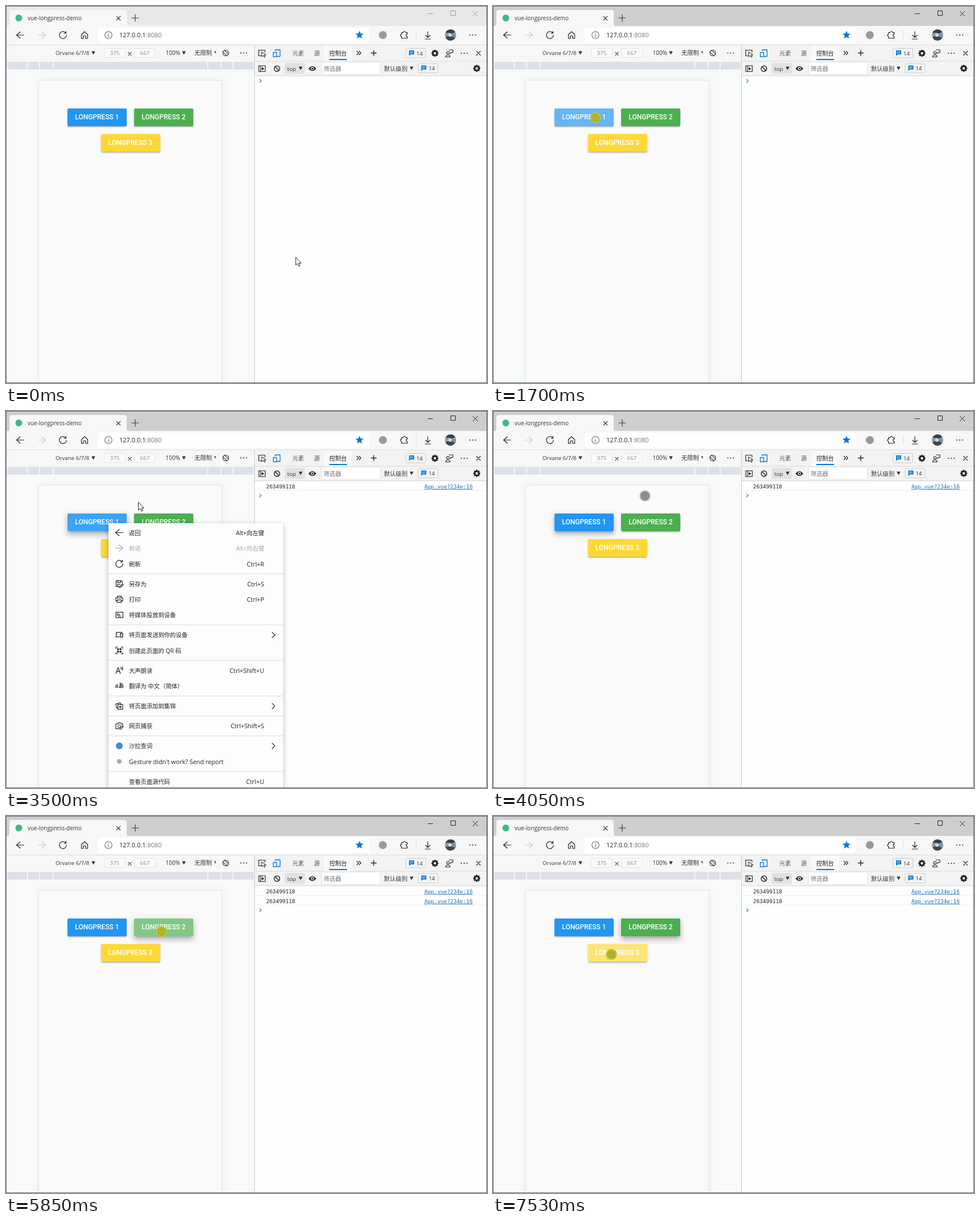
An HTML page for the animation above (8000 ms loop, 845 by 662 pixels).

```html
<!DOCTYPE html>
<html lang="zh-CN">
<head>
<meta charset="utf-8">
<title>Long press demo</title>
<style>
html, body { margin: 0; width: 100%; height: 100%; overflow: hidden; background: #fff; }
#stage { position: absolute; left: 0; top: 0; width: 845px; height: 662px; overflow: hidden; }
svg { position: absolute; left: 0; top: 0; }
text { font-family: "Open Sans", "Noto Sans CJK SC", "Noto Sans CJK", sans-serif; }
.mono { font-family: "DejaVu Sans Mono", monospace; }
.line { fill: none; stroke: #222; stroke-width: 1.2; stroke-linecap: round; stroke-linejoin: round; }
.btn { position: absolute; width: 104px; height: 31px; border-radius: 2px; color: #fff;
  font: 500 12px/30.5px Roboto, sans-serif; text-align: center; white-space: nowrap; }
</style>
</head>
<body>
<div id="stage">
  <svg id="window" width="845" height="662"></svg>
  <div id="buttons"></div>
  <svg id="overlay" width="845" height="662"></svg>
</div>
<script>
const LOOP = 8000;
const $ = id => document.getElementById(id);
const clamp = v => Math.max(0, Math.min(1, v));

const rect = (x, y, w, h, fill, extra = '') =>
  `<rect x="${x}" y="${y}" width="${w}" height="${h}" fill="${fill}" ${extra}/>`;
const circle = (x, y, r, fill, extra = '') =>
  `<circle cx="${x}" cy="${y}" r="${r}" fill="${fill}" ${extra}/>`;
const line = (d, color = '#222', width = 1.2) =>
  `<path class="line" d="${d}" style="stroke:${color};stroke-width:${width}"/>`;
const shape = (d, fill = '#222', extra = '') => `<path d="${d}" fill="${fill}" ${extra}/>`;
const text = (x, y, s, size = 10.3, fill = '#333', extra = '') =>
  `<text x="${x}" y="${y}" font-size="${size}" fill="${fill}" ${extra}>${s}</text>`;
const at = (x, y, content) => `<g transform="translate(${x} ${y})">${content}</g>`;
const caret = (x, y) => shape(`M${x - 3.3} ${y - 3}h6.6l-3.3 6z`, '#333');
const dots = (x, y) => [-5, 0, 5].map(d => circle(x + d, y, 1, '#222')).join('');
const cross = (x, y, r, color) =>
  line(`M${x - r} ${y - r}l${2 * r} ${2 * r}m0 ${-2 * r}l${-2 * r} ${2 * r}`, color, 1.1);
const arrowIcon = (dir, color) => line(`M${-6.5 * dir} 0H${6.5 * dir}M0 -5.5L${6.5 * dir} 0L0 5.5`, color);
const reload = line('M5 -3.6A6.2 6.2 0 1 0 6.2 0M5.4 -6.5V-3H2');
const gear = circle(0, 0, 3.6, 'none', 'stroke="#222" stroke-width="2.8"') +
  [...Array(8)].map((_, i) => rect(-1.3, -6.2, 2.6, 3, '#222', `transform="rotate(${i * 45})"`)).join('');
const ban = circle(0, 0, 4.8, 'none', 'stroke="#222" stroke-width="1.5"') + line('M-3.3 -3.3L3.3 3.3', '#222', 1.5);
const chip = (x, y) =>
  rect(x + .5, y + .5, 35, 16.5, '#f4f4f4', 'stroke="#ccc" rx="2"') +
  shape(`M${x + 6} ${y + 4}h9v7h-6l-3 2.6z`, '#0078d4') +
  line(`M${x + 8} ${y + 6.5}h5m-5 2.2h4`, '#fff', .8) +
  text(x + 19, y + 12.5, '14', 9.6);

function drawWindow() {
  const star = [...Array(10)].map((_, i) => {
    const r = i % 2 ? 3.4 : 7.6, a = i * Math.PI / 5;
    return `${(r * Math.sin(a)).toFixed(1)},${(-r * Math.cos(a)).toFixed(1)}`;
  }).join(' ');
  return [
    rect(0, 0, 845, 662, '#fff'),
    rect(0, 0, 845, 36, '#e8e8e8', 'id="titlebar"'),
    shape('M2 35.5Q6 35 6 31V11Q6 7 10 7H208Q212 7 212 11V31Q212 35 216 35.5z', '#f7f7f7'),
    circle(22.5, 21, 6, '#41b883'),
    text(38, 24.8, 'vue-longpress-demo', 9.95),
    cross(197.5, 21.5, 3.4, '#222'),
    line('M221 21H233M227 15V27', '#333', 1.1),
    `<g id="controls" fill="none" stroke="#999" stroke-width="1">
      <path d="M741 13.5h9M781.5 8.5h8v8h-8zM820 9l9 9m0 -9l-9 9"/></g>`,

    rect(0, 35, 845, 33, '#f7f7f7'),
    at(25, 51, arrowIcon(-1, '#222')),
    at(63, 51, arrowIcon(1, '#ccc')),
    at(100, 51, reload),
    at(138, 51, line('M-5.5 -.8L0 -6L5.5 -.8V6H2V1.5H-2V6H-5.5z')),
    rect(161, 38, 477, 27, '#fff', 'rx="4"'),
    circle(180, 51, 6.3, 'none', 'stroke="#666" stroke-width="1.1"'),
    line('M180 50.4V54.2M180 47.8V48', '#555', 1.2),
    text(199, 55, '127.0.0.1<tspan fill="#777">:8080</tspan>', 11, '#222'),
    at(621, 51, `<polygon points="${star}" fill="#0a78d6"/>`),
    circle(662, 51, 7, '#9a9a9a'),
    at(700, 51, line('M-5 -4.5H-2A2 2 0 1 1 2 -4.5H4.8V-1.6A2 2 0 1 0 4.8 2.4V5.5H-5V2.4A2 2 0 1 1 -5 -1.6z')),
    line('M720.5 43V59', '#ddd', 1),
    at(741, 51, line('M0 -6V4M-4 .3L0 4.2L4 .3M-4.8 7H4.8')),
    circle(781, 51, 10, '#8d9aa6'),
    shape('M772 47A10 10 0 0 1 789 45Q785 50 779 47z', '#35404a'),
    shape('M772 55Q780 50 789 56A10 10 0 0 1 775 59z', '#3d4650'),
    circle(780, 51, 3, '#e3d3c5'), circle(786, 52, 2.5, '#5e91b8'),
    dots(820, 51),

    rect(0, 68, 436, 30, '#f7f7f7'),
    rect(0, 97, 436, 565, '#f8f9f9'),
    rect(0, 68, 845, 1, '#dcdcdc'),
    text(87, 86.3, 'Orvane 6/7/8', 9.7), caret(153.5, 82.5),
    rect(172.5, 74.5, 37, 16, '#fafafa', 'stroke="#e2e2e2" rx="2"'),
    rect(225.5, 74.5, 37, 16, '#fafafa', 'stroke="#e2e2e2" rx="2"'),
    text(191, 86.3, '375', 9.8, '#888', 'text-anchor="middle"'),
    text(244, 86.3, '667', 9.8, '#888', 'text-anchor="middle"'),
    cross(217.5, 84, 2.6, '#333'),
    text(280.5, 86.3, '100%', 10), caret(312.5, 82.5),
    text(331, 86.3, '无限制'), shape('M365.5 79.5h3v4.5z', '#333'),
    at(386, 82.5, circle(0, 0, 5, 'none', 'stroke="#333" stroke-width="1.1"') +
      rect(-2, -5, 4, 10, '#f7f7f7', 'stroke="#333" transform="rotate(-45)"')),
    dots(417.5, 82.5),
    rect(2, 98, 433, 13.5, '#dde0e8'),
    [37.5, 59, 83, 354.5, 378, 399].map(x => rect(x - .8, 98, 1.6, 13.5, '#fafafa')).join(''),
    rect(57.5, 130.5, 321.5, 560, '#fafafa',
      'stroke="#e0e5e6" style="filter:drop-shadow(0 0 6px rgba(0,30,30,.06))"'),

    rect(437, 69, 408, 53, '#f3f3f3'),
    rect(437, 96.5, 408, 1, '#dcdcdc'),
    rect(437, 122, 408, 1, '#d4d4d4'),
    rect(436, 69, 1, 593, '#c9c9c9'),
    line('M449 87.5H444V77.5H455V81', '#222', 1.2),
    shape('M449 80.5L457 86H453.5L455.5 89L453.8 90L452 87L449 89z', '#f3f3f3', 'stroke="#222"'),
    line('M473 78.5V77H481.5V88.5H476.5', '#0078d4', 1.3),
    rect(469.6, 81.6, 5.8, 7.6, 'none', 'stroke="#0078d4" stroke-width="1.3"'),
    rect(559, 70, 49, 27, '#f9f9f9'),
    text(503, 86.5, '元素', 10.3, '#555'),
    text(541, 86.5, '源', 10.3, '#555'),
    text(568, 86.5, '控制台', 10.3, '#222'),
    rect(568, 93, 31, 2, '#0078d4'),
    line('M616.5 79.5L619.5 82.5L616.5 85.5M620.5 79.5L623.5 82.5L620.5 85.5', '#222', 1.3),
    line('M641.5 82.5H650.5M646 78V87', '#222', 1.4),
    chip(702, 74), at(753.5, 83, gear),
    at(779, 83, circle(-2.5, -1, 2.3, 'none', 'stroke="#222" stroke-width="1.1"') +
      line('M-6.5 6.5Q-6.5 3 -2.5 3Q1 3 1 6.5zM-.5 -6H6V-1.5H3.5L1.5 .5')),
    dots(805, 83), cross(830, 83, 3.5, '#222'),
    rect(444, 105, 11.5, 10, 'none', 'stroke="#222" stroke-width="1.1"'),
    line('M447 105V115', '#222', 1.1), shape('M449 107.2L454 110L449 112.8z'),
    at(476, 110, ban),
    rect(489.5, 100, 35.5, 19.5, '#e2e2e2', 'rx="2"'),
    text(494, 113.5, 'top', 9.8), caret(517.5, 109.5),
    shape('M531.5 110Q538 101.5 545 110Q538 118 531.5 110z'),
    circle(538.2, 109.7, 2.8, '#f3f3f3'), circle(538.2, 109.7, 1.5, '#222'),
    rect(554.5, 98.5, 103, 21.5, '#fff', 'stroke="#e4e4e4" rx="2"'),
    text(558, 113.5, '筛选器', 10.3, '#777'),
    text(664, 113.5, '默认级别'), caret(712.5, 109.5),
    chip(723.5, 100.5), at(827, 109.5, gear),
    rect(437, 123, 408, 539, '#fefefe'),
    logRow('log1', 136), logRow('log2', 153),
    `<path id="prompt" class="line" d="M445.5 -2.8L448.3 0L445.5 2.8" style="stroke:#2a86d8"/>`
  ].join('');
}

function logRow(id, y) {
  return `<g id="${id}">` + rect(437, y + 3, 408, 1, '#eee') +
    text(457, y, '263499118', 9.42, '#222', 'class="mono"') +
    text(735, y, 'App.vue?234e:16', 9.42, '#1a6fb0', 'class="mono" text-decoration="underline"') + '</g>';
}

const menuIcons = {
  back: arrowIcon(-1, '#222'),
  forward: arrowIcon(1, '#aaa'),
  reload,
  save: line('M-1 5H-5.5V-5.5H3.5L5.5 -3.5V-1M-3 -5V-2H2.5V-5M-3 5V1H1M0 5.5L5.5 .3L7 2L2 6.5H0z'),
  print: line('M-3.5 -2.5V-5.5H3.5V-2.5M-3.5 3H-6V-2.5H6V3H3.5M-3.5 1H3.5V5.5H-3.5z'),
  cast: line('M-6 -4.7H6.5V4.7H-6zM-4 0A3 3 0 0 1 -1 3M-4 -2.3A5.3 5.3 0 0 1 1.5 3'),
  devices: line('M-6.5 3.5H0M-5 2V-4.5H5M2 -2.3H6V4H2z', '#222', 1.4),
  code: line('M-6 -3V-6H-3M3 -6H6V-3M6 3V6H3M-3 6H-6V3', '#222', 1.1) +
    [[-3.8, -3.8], [.6, -3.8], [-3.8, .6], [.6, .6]].map(([x, y]) => rect(x, y, 3.2, 3.2, '#222')).join(''),
  read: line('M-6 5.5L-2 -5L2 5.5M-4.5 1.7H.5M2.6 -5Q4 -3.5 3.2 -1.5M4.8 -6Q7 -3.5 5.4 -.4'),
  translate: text(-7.5, 3.5, 'aあ', 10, '#222', 'font-weight="600"'),
  collect: line('M-3 3.5H-4.5L-6 -3.5L2 -5.5L3 -3M-2.5 -2.5H6V6H-2.5zM1.8 -.5V4M-.5 1.8H4'),
  capture: line('M-6 2V-3.5H-3L-1.5 -5.5H2L3.5 -3.5H6V-1M-6 2V5H-1M0 5.5L5.5 0L7 1.5L2 6.5') +
    circle(0, .5, 2.5, 'none', 'stroke="#222"'),
  salad: circle(0, 0, 6, '#3c8fc9'),
  gesture: circle(0, 0, 4, '#aaa')
};

// Each group is closed by a separator; '>' stands for a submenu.
const menuGroups = [
  [['back', '返回', 'Alt+向左键'], ['forward', '前进', 'Alt+向右键'], ['reload', '刷新', 'Ctrl+R']],
  [['save', '另存为', 'Ctrl+S'], ['print', '打印', 'Ctrl+P'], ['cast', '将媒体投放到设备']],
  [['devices', '将页面发送到你的设备', '>'], ['code', '创建此页面的 QR 码']],
  [['read', '大声朗读', 'Ctrl+Shift+U'], ['translate', '翻译为 中文（简体）']],
  [['collect', '将页面添加到集锦', '>']],
  [['capture', '网页捕获', 'Ctrl+Shift+S']],
  [['salad', '沙拉查词', '>'], ['gesture', "Gesture didn't work? Send report"]],
  [['', '查看页面源代码', 'Ctrl+U']]
];

function drawMenu() {
  let y = 17;
  let out = rect(0, 0, 307, 500, '#fdfdfd',
    'rx="3" style="filter:drop-shadow(0 2px 4px rgba(0,0,0,.28))"');
  menuGroups.forEach((group, g) => {
    if (g) {
      out += rect(0, y - 10.9, 307, 1, '#dadada');
      y += 7.6;
    }
    for (const [icon, label, key] of group) {
      const color = icon === 'forward' ? '#a5a5a5' : '#222';
      const size = s => /^[\x00-\x7f]+$/.test(s) ? 10.8 : 10.3;
      if (icon) out += at(19, y - .5, menuIcons[icon]);
      out += text(36, y + 3.8, label, size(label), color);
      if (key === '>') out += line(`M287.5 ${y - 5}l5 4.7l-5 4.7`);
      else if (key) out += text(273.5, y + 3.8, key, size(key), color, 'text-anchor="end"');
      y += 27.4;
    }
  });
  return out;
}

const buttons = [
  { x: 108, y: 180, color: '#2196f3', press: 1700, release: 3260 },
  { x: 225, y: 180, color: '#4caf50', press: 5050, release: 6230 },
  { x: 166.5, y: 224.5, color: '#fdd835', press: 7310, release: LOOP }
];

$('window').innerHTML = drawWindow();
$('buttons').innerHTML = buttons.map((b, i) =>
  `<div class="btn" style="left:${b.x}px;top:${b.y}px;background-color:${b.color}">LONGPRESS ${i + 1}</div>`).join('');
$('overlay').innerHTML =
  `<g id="menu">${drawMenu()}</g>
  <g id="touch">${circle(0, 0, 10, '#bdbdbd', 'id="ring" opacity=".85"')}${circle(0, 0, 8, '#8d8d8d', 'id="dot"')}</g>
  <path id="arrow" d="M0 0V14.2L3.3 11.2L5.4 16L7.6 15L5.5 10.4H9.8Z" fill="#fff" stroke="#222"/>
  <rect x=".5" y=".5" width="844" height="661" fill="none" stroke="#6a6e74"/>`;
const buttonNodes = [...document.querySelectorAll('.btn')];

function stepped(t, start, end, steps) {
  if (t < start) return 0;
  return Math.min(steps, Math.floor((t - start) * (steps - 1) / (end - start) + .01) + 1) / steps;
}

const moves = [
  { start: 710, end: 1490, steps: 11, path: [[509, 441], [350, 396], [180, 196]] },
  { start: 3340, end: 3650, steps: 5, path: [[180, 197], [215, 160], [267, 149]] },
  { start: 4270, end: 4730, steps: 7, path: [[267, 149], [284, 180], [273, 203]] },
  { start: 6310, end: 6540, steps: 4, path: [[273, 203], [330, 200], [380, 190]] },
  { start: 6700, end: 7160, steps: 7, path: [[380, 190], [300, 200], [208, 243]] }
];

function pointerAt(t) {
  const move = moves.filter(m => t >= m.start).pop() || moves[0];
  const p = stepped(t, move.start, move.end, move.steps);
  const u = p * p * (3 - 2 * p);
  const [a, b, c] = move.path;
  return [0, 1].map(i => (1 - u) ** 2 * a[i] + 2 * u * (1 - u) * b[i] + u * u * c[i]);
}

function elevation(k) {
  const layers = [
    [3, 1, -2, 5, 5, -3, .2],
    [2, 2, 0, 8, 10, 1, .14],
    [1, 5, 0, 3, 14, 2, .12]
  ];
  return layers.map(l => {
    const [y, blur, spread] = [0, 1, 2].map(i => ((l[i] + (l[i + 3] - l[i]) * k) * .857).toFixed(2) + 'px');
    return `0 ${y} ${blur} ${spread} rgba(0,0,0,${l[6]})`;
  }).join(',');
}

function glow(t, b) {
  if (t < b.press) return 0;
  const on = b.press === 7310 ? stepped(t, 7310, 7390, 2) : 1;
  return .3 * on * (1 - clamp((t - b.release) / 960)) ** 3;
}

const within = (t, spans) => spans.some(([a, b]) => t >= a && t < b);
const show = (id, on) => $(id).setAttribute('visibility', on ? 'visible' : 'hidden');

function render(t) {
  const active = t >= 1700;
  $('titlebar').setAttribute('fill', active ? '#cecece' : '#e8e8e8');
  $('controls').setAttribute('stroke', active ? '#222' : '#999');

  const logs = (t >= 2570) + (t >= 5850);
  show('log1', logs > 0);
  show('log2', logs > 1);
  $('prompt').setAttribute('transform', `translate(0 ${131.5 + 17 * logs})`);

  const lifted = [
    t < 4050 ? stepped(t, 1870, 2020, 3) : t < 4130 ? .85 : 0,
    stepped(t, 5200, 5280, 2),
    0
  ];
  buttons.forEach((b, i) => {
    const white = `rgba(255,255,255,${glow(t, b).toFixed(3)})`;
    buttonNodes[i].style.backgroundImage = `linear-gradient(${white},${white})`;
    buttonNodes[i].style.boxShadow = elevation(lifted[i]);
  });

  show('menu', within(t, [[3270, 3810], [6230, 6700]]));
  $('menu').setAttribute('transform', t < 5000 ? 'translate(180 197)' : 'translate(272 203)');

  const [x, y] = pointerAt(t);
  const overPage = x > 58 && x < 379 && y > 130;
  const touching = overPage && !within(t, [[3180, 3810], [6150, 6700]]);
  const pressed = within(t, [[1700, 3180], [5050, 6150], [7310, LOOP]]);
  const clicked = within(t, [[3730, 3810], [6620, 6700]]);
  for (const id of ['touch', 'arrow']) $(id).setAttribute('transform', `translate(${x.toFixed(1)} ${y.toFixed(1)})`);
  show('touch', touching);
  show('arrow', !touching);
  $('ring').setAttribute('fill', pressed ? '#bfc548' : '#bdbdbd');
  $('dot').setAttribute('fill', pressed ? '#b0b22a' : '#8d8d8d');
  $('arrow').setAttribute('stroke', clicked ? '#2f9e3f' : '#222');
}

const began = performance.now();
function frame() {
  render((performance.now() - began) % LOOP);
  requestAnimationFrame(frame);
}
frame();
</script>
</body>
</html>
```
